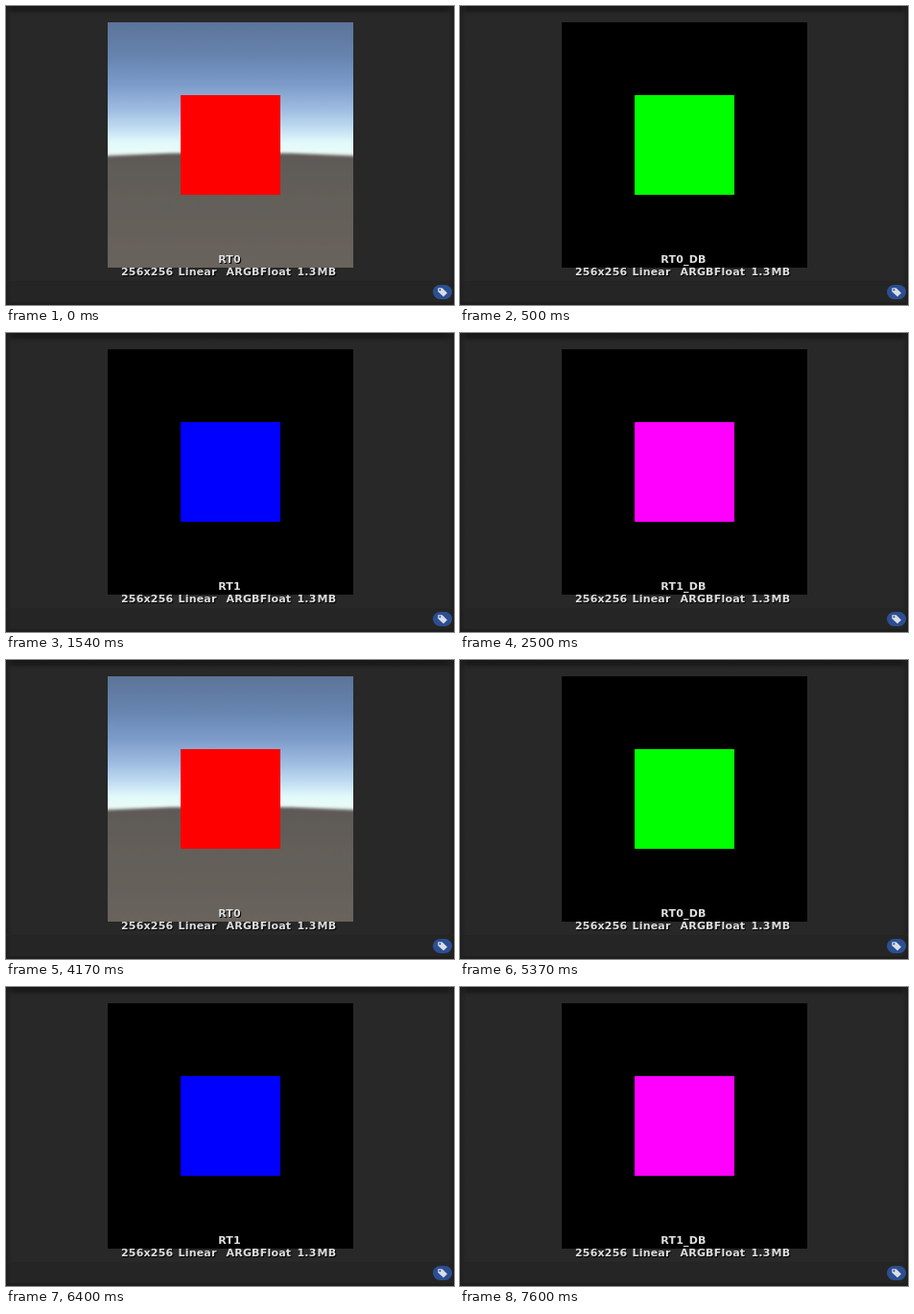
Recreate the animation shown at these times as an HTML page. Size 467 px wide and 312 px high, loop 8 s.

```html
<!DOCTYPE html>
<html lang="en">
<head>
<meta charset="utf-8">
<title>Render texture preview</title>
<style>
  html, body { margin: 0; width: 100%; height: 100%; overflow: hidden; background: #282828; }
  svg { display: block; width: 100%; height: 100%; }
  text { font: bold 11px "DejaVu Sans", Verdana, sans-serif; letter-spacing: .2px; }
  .shadow { fill: #000; }
  .face { fill: #dedede; }
</style>
</head>
<body>
<svg viewBox="0 0 467 312" xmlns="http://www.w3.org/2000/svg">
  <defs>
    <linearGradient id="topEdge" x2="0" y2="1">
      <stop offset="0" stop-color="#181818"/>
      <stop offset=".45" stop-color="#1c1c1c"/>
      <stop offset="1" stop-color="#282828" stop-opacity="0"/>
    </linearGradient>
    <linearGradient id="sideEdge">
      <stop offset="0" stop-color="#1d1d1d"/>
      <stop offset="1" stop-color="#282828" stop-opacity="0"/>
    </linearGradient>
    <linearGradient id="sky" gradientUnits="userSpaceOnUse" x1="0" y1="17" x2="0" y2="160">
      <stop offset="0" stop-color="#5c7499"/>
      <stop offset=".25" stop-color="#6684af"/>
      <stop offset=".46" stop-color="#7d9cca"/>
      <stop offset=".64" stop-color="#9fbde2"/>
      <stop offset=".77" stop-color="#c0dcf1"/>
      <stop offset=".88" stop-color="#e2fafb"/>
      <stop offset=".94" stop-color="#e8fbf8"/>
      <stop offset="1" stop-color="#d4dedc"/>
    </linearGradient>
    <linearGradient id="ground" gradientUnits="userSpaceOnUse" x1="0" y1="153" x2="0" y2="273">
      <stop offset="0" stop-color="#5d5957"/>
      <stop offset=".3" stop-color="#625d59"/>
      <stop offset="1" stop-color="#69635b"/>
    </linearGradient>
    <filter id="haze" x="-5%" y="-5%" width="110%" height="110%">
      <feGaussianBlur stdDeviation="0 1.8"/>
    </filter>
    <clipPath id="frame"><rect x="106" y="17" width="256" height="256"/></clipPath>
  </defs>

  <rect width="467" height="312" fill="#282828"/>
  <rect y="288" width="467" height="24" fill="#252525"/>
  <rect width="467" height="11" fill="url(#topEdge)"/>
  <rect width="8" height="312" fill="url(#sideEdge)"/>
  <rect width="8" height="312" fill="url(#sideEdge)" transform="matrix(-1 0 0 1 467 0)"/>
  <rect y="287" width="467" height="1" fill="#242424"/>
  <rect y="309" width="467" height="3" fill="#1f1f1f"/>

  <rect x="106" y="17" width="256" height="256" fill="#000"/>
  <g id="scene" clip-path="url(#frame)">
    <rect x="106" y="17" width="256" height="256" fill="url(#sky)"/>
    <path d="M96 157Q234 149 372 157V290H96Z" fill="url(#ground)" filter="url(#haze)"/>
  </g>
  <rect id="cube" x="182" y="93" width="104" height="104"/>
  <g id="labels"></g>

  <rect x="445" y="291" width="20" height="15" rx="7.5" fill="#2c4f93"/>
  <path fill-rule="evenodd" fill="#d9dee8"
    d="M450.3 294.3H454.7L460 299.5L456 303.3L450.3 298.1ZM451.4 296.2a1 1 0 1 0 2 0a1 1 0 1 0-2 0Z"/>
</svg>
<script>
  const LOOP = 8000;
  const STATES = {
    RT0: { color: '#f00', sky: true },
    RT0_DB: { color: '#0f0' },
    RT1: { color: '#00f' },
    RT1_DB: { color: '#f0f' }
  };
  const CUES = [
    [0, 'RT0'], [500, 'RT0_DB'], [1540, 'RT1'], [2500, 'RT1_DB'],
    [4170, 'RT0'], [5370, 'RT0_DB'], [6400, 'RT1'], [7600, 'RT1_DB']
  ];
  const byId = id => document.getElementById(id);
  const cube = byId('cube'), scene = byId('scene'), labels = byId('labels');

  // Each label is a light face over a dark offset copy.
  function addLabel(x, y, str, anchor = 'start') {
    return [['shadow', 1], ['face', 0]].map(([kind, shift]) => {
      const el = document.createElementNS('http://www.w3.org/2000/svg', 'text');
      el.setAttribute('class', kind);
      el.setAttribute('x', x + shift);
      el.setAttribute('y', y + shift);
      el.setAttribute('text-anchor', anchor);
      el.textContent = str;
      labels.appendChild(el);
      return el;
    });
  }

  const title = addLabel(233, 268, 'RT0', 'middle');
  [[120, '256x256'], [179.5, 'Linear'], [229.5, 'ARGBFloat'], [303.5, '1.3'], [324.5, 'MB']]
    .forEach(([x, word]) => addLabel(x, 281, word));

  let shown = '';
  function draw(time) {
    const name = CUES.filter(([start]) => start <= time).pop()[1];
    if (name === shown) return;
    shown = name;
    const state = STATES[name];
    cube.setAttribute('fill', state.color);
    scene.style.display = state.sky ? '' : 'none';
    title.forEach(el => { el.textContent = name; });
  }

  const begin = performance.now();
  function tick() {
    draw((performance.now() - begin) % LOOP);
    requestAnimationFrame(tick);
  }
  tick();
</script>
</body>
</html>
```
